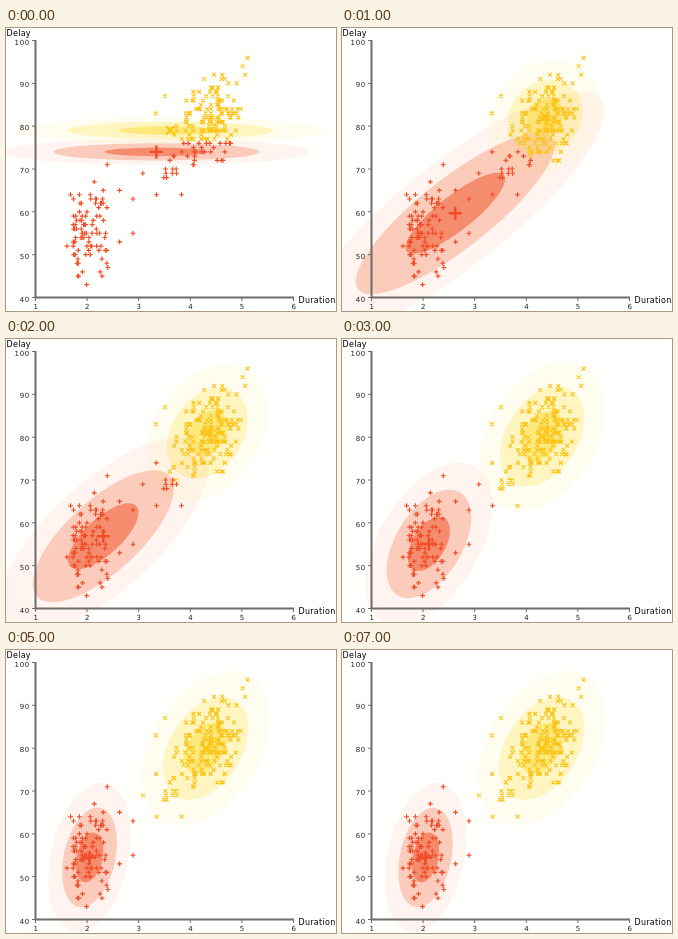
These frames come from a looping animation (330x283 px, 7500 ms). An HTML page:

```html
<!DOCTYPE html>
<html lang="en">
<head>
<meta charset="utf-8">
<title>Two-cluster fit</title>
<style>
html, body { margin: 0; width: 100%; height: 100%; overflow: hidden; background: #fffffd; }
svg { display: block; width: 330px; height: 283px; }
text { font: 7px "DejaVu Sans", sans-serif; letter-spacing: .7px; fill: #222; }
.title { font-size: 8px; letter-spacing: .28px; fill: #000; }
.axis { fill: none; stroke: #6c6c6c; stroke-width: 2; }
.tick { fill: none; stroke: #6c6c6c; stroke-width: 1; }
.mark { fill: none; stroke-width: 1.15; }
.mean { fill: none; stroke-width: 2.4; }
</style>
</head>
<body>
<svg id="stage" viewBox="0 0 330 283"></svg>
<script>
const LOOP = 7500, STEP = 500;
const svg = document.getElementById('stage');
const px = d => 30 + 51.6 * (d - 1);
const py = w => 269.5 - 4.283 * (w - 40);

const plus = (x, y, r) => `M${x - r} ${y}h${2 * r}M${x} ${y - r}v${2 * r}`;
const cross = (x, y, r) =>
  `M${x - r} ${y - r}l${2 * r} ${2 * r}M${x - r} ${y + r}l${2 * r} ${-2 * r}`;

// pixel mean, variances and covariance (y upwards)
const pose = (x, y, sx, sy, rho) => ({ x, y, xx: sx * sx, yy: sy * sy, xy: rho * sx * sy });

const clusters = [
  {
    fill: '#f04f23', line: '#f04c26', alpha: [.06, .25, .5], shape: plus, r: 2.4, meanR: 6.5,
    guess: pose(px(3.333), py(74), 51.6, 4.28, 0),
    first: pose(117, 182.5, 52.5, 42, .86),
    last: pose(83.5, 207.5, 13.6, 24.9, .285)
  },
  {
    fill: '#fad41e', line: '#fcc419', alpha: [.06, .22, .42], shape: cross, r: 1.9, meanR: 4,
    guess: pose(px(3.6), py(79), 51.6, 4.28, 0),
    first: pose(203.5, 88, 18.4, 17.8, .1),
    last: pose(199.7, 98.3, 21.3, 25.7, .38)
  }
];

// the fit jumps away from the guess, then settles in a bell-shaped decay
function fitAt({ guess, first, last }, step) {
  if (step === 0) return guess;
  const left = Math.exp(-(((step - 1) / 3.2) ** 1.85));
  const fit = {};
  for (const k in last) fit[k] = last[k] + (first[k] - last[k]) * left;
  return fit;
}

let seed = 2718;
const rnd = () => (seed = (seed * 16807) % 2147483647) / 2147483647;
const gauss = () => Math.sqrt(-2 * Math.log(rnd())) * Math.cos(2 * Math.PI * rnd());

const points = [];
function scatter(count, pick, ok = () => true) {
  while (count) {
    const [d, w] = pick();
    if (ok(d, w)) { points.push([px(d), py(Math.round(w))]); count--; }
  }
}

// short eruptions, long eruptions, and the thin bridge between them
scatter(90, () => [1.72 + .68 * rnd() ** 1.4, 53.6 + 5.6 * gauss()],
  (d, w) => w > 44.5 && w < 65);
scatter(158, () => {
  const g = gauss();
  return [4.36 + .3 * g, 80.6 + 1.2 * g + 5 * gauss()];
}, (d, w) => d > 3.55 && d < 5.08 && w > 70 && w < 94);
scatter(12, () => {
  const t = rnd();
  return [3.3 + .85 * t, 67 + 5 * t + 1.5 * gauss()];
});

// outermost points
const strays = [[5.1, 96], [3.32, 83], [3.5, 87], [3.33, 74], [3.07, 69], [3.82, 64], [2.38, 71],
  [2.13, 67], [2.62, 65], [2.88, 63], [2.88, 55], [2.62, 53], [1.6, 52], [1.67, 64], [1.98, 43]];
for (const [d, w] of strays) points.push([px(d), py(w)]);

function add(tag, attrs, label) {
  const el = document.createElementNS('http://www.w3.org/2000/svg', tag);
  for (const k in attrs) el.setAttribute(k, attrs[k]);
  if (label !== undefined) el.textContent = label;
  return svg.appendChild(el);
}

for (const c of clusters) {
  c.rings = [3, 2, 1].map((r, i) =>
    add('circle', { r, fill: c.fill, 'fill-opacity': c.alpha[i] }));
}

add('path', { class: 'axis', d: 'M29.5 12V269.5H288' });
for (let w = 40; w <= 100; w += 10) {
  add('path', { class: 'tick', d: `M26 ${py(w)}h3.5` });
  add('text', { x: 24, y: py(w) + 4, 'text-anchor': 'end' }, w);
}
for (let d = 1; d <= 6; d++) {
  add('path', { class: 'tick', d: `M${px(d) - .5} 269.5v3.5` });
  add('text', { x: px(d), y: 281, 'text-anchor': 'middle' }, d);
}
add('text', { class: 'title', x: 0.5, y: 7.5 }, 'Delay');
add('text', { class: 'title', x: 292.5, y: 274.5 }, 'Duration');

for (const c of clusters) {
  c.marks = add('path', { class: 'mark', stroke: c.line });
  c.mean = add('path', { class: 'mean', stroke: c.line });
}

// lower score = more likely member
function score([x, y], f) {
  const u = x - f.x, v = f.y - y, det = f.xx * f.yy - f.xy * f.xy;
  return (u * u * f.yy + v * v * f.xx - 2 * u * v * f.xy) / det + Math.log(det);
}

function draw(step) {
  const fits = clusters.map(c => fitAt(c, step)), paths = ['', ''];
  for (const p of points) {
    const k = score(p, fits[0]) <= score(p, fits[1]) ? 0 : 1;
    paths[k] += clusters[k].shape(p[0], p[1], clusters[k].r);
  }
  clusters.forEach((c, k) => {
    const f = fits[k], sx = Math.sqrt(f.xx), shear = f.xy / sx;
    const m = [sx, -shear, 0, Math.sqrt(f.yy - shear * shear), f.x, f.y];
    for (const ring of c.rings) ring.setAttribute('transform', `matrix(${m})`);
    c.marks.setAttribute('d', paths[k]);
    c.mean.setAttribute('d', c.shape(f.x, f.y, c.meanR));
  });
}

const start = performance.now();
let shown = -1;
function tick() {
  const step = Math.floor(((performance.now() - start) % LOOP) / STEP);
  if (step !== shown) draw(shown = step);
  requestAnimationFrame(tick);
}
tick();
</script>
</body>
</html>
```
